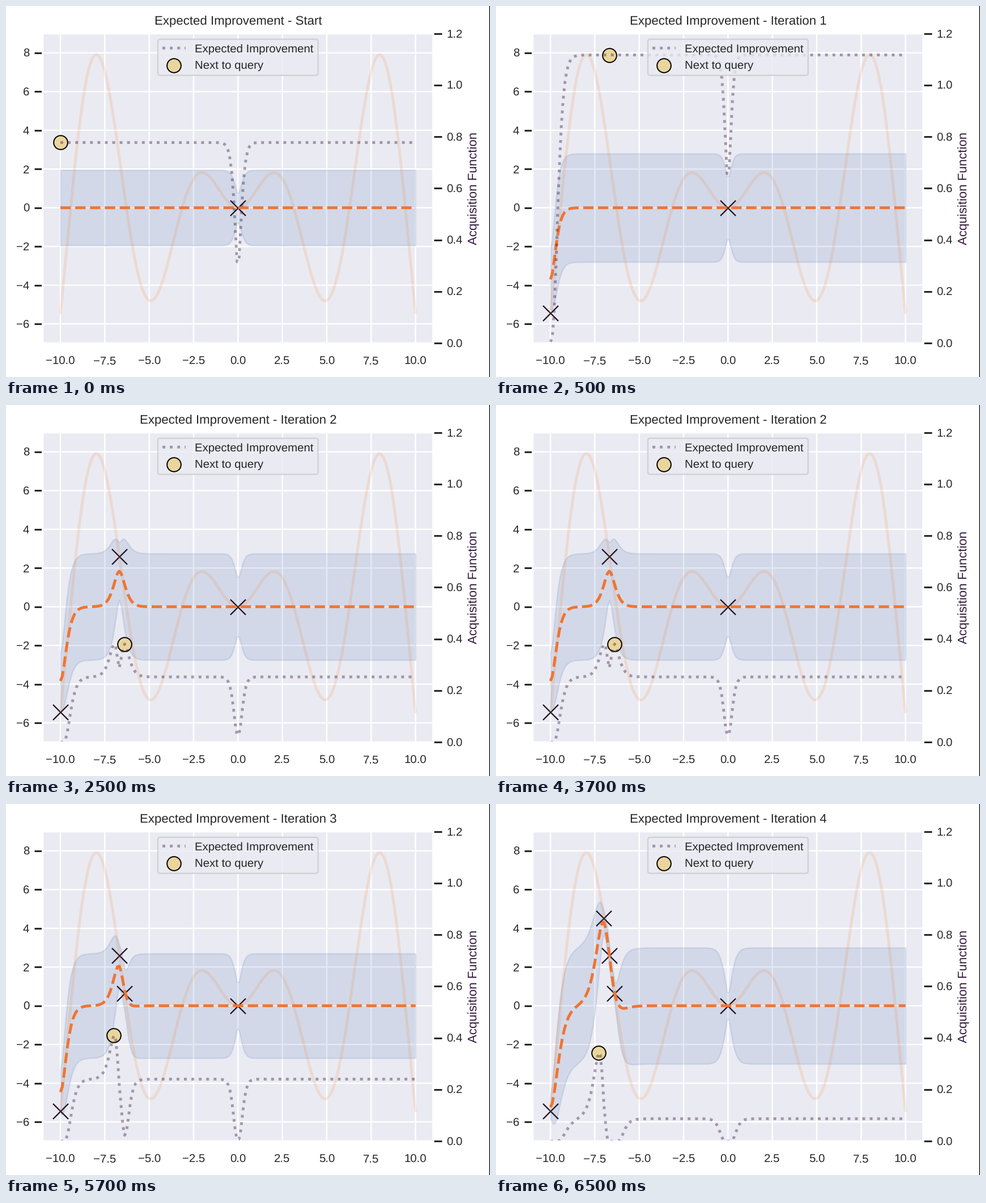
These frames come from a looping animation (854x656 px, 8 s). A matplotlib script:

```python
import math

import matplotlib.pyplot as plt
import numpy as np
from matplotlib.animation import FuncAnimation
from matplotlib.lines import Line2D

W, H, DPI = 854, 656, 177.6
LEFT, RIGHT, TOP, BOTTOM = 64.7, 753.9, 48.7, 596.3

INK = "0.15"
PANEL = "#eaeaf2"
ORANGE = "#f07432"
PEACH = "#f58028"
BLUE = "#4c72b0"
PURPLE = "#35193e"
SAND = "#ead59c"

plt.rcParams.update({
    "font.family": "Liberation Sans",
    "font.size": 9,
    "axes.titlesize": 9,
    "axes.labelsize": 9,
    "xtick.labelsize": 8.25,
    "ytick.labelsize": 8.25,
    "legend.fontsize": 8.25,
    "text.color": INK,
    "text.hinting": "none",
    "path.snap": False,
    "axes.facecolor": PANEL,
    "axes.edgecolor": "white",
    "axes.linewidth": 1.25,
    "axes.axisbelow": True,
    "grid.color": "white",
    "grid.linewidth": 1,
    "patch.linewidth": 1,
    "lines.linewidth": 2,
    "lines.solid_capstyle": "round",
})

xs = np.linspace(-10, 10, 200)
# Observed points in query order, and the point asked for after the last step
QUERIES = np.array([0, *xs[[0, 33, 36, 30, 27]]])
# Fitted kernel variance, noise variance and length scale for each step
FITS = [(3.80, 0.62, 0.38), (7.84, 3.69, 0.32), (7.56, 3.16, 0.36),
        (7.29, 1.60, 0.365), (9.00, 0.35, 0.48)]

norm_cdf = np.vectorize(lambda z: 0.5 * (1 + math.erf(z / math.sqrt(2))))


def objective(x):
    return x * np.sin(x)


def matern(a, b, length):
    s = math.sqrt(5) * np.abs(np.subtract.outer(a, b)) / length
    return (1 + s + s**2 / 3) * np.exp(-s)


def posterior(step, x):
    variance, noise, length = FITS[step]
    known = QUERIES[:step + 1]
    gram = variance * matern(known, known, length) + noise * np.eye(len(known))
    cross = variance * matern(x, known, length)
    weights = np.linalg.solve(gram, cross.T)
    mean = weights.T @ objective(known)
    spread = np.sqrt(variance - np.sum(cross.T * weights, axis=0))
    return mean, spread


def expected_improvement(step, x):
    mean, spread = posterior(step, x)
    gain = mean - objective(QUERIES[:step + 1]).max()
    z = gain / spread
    density = np.exp(-z**2 / 2) / math.sqrt(2 * math.pi)
    return gain * norm_cdf(z) + spread * density


fig = plt.figure(figsize=((W + 0.01) / DPI, (H + 0.01) / DPI), dpi=DPI,
                 facecolor="white")
ax = fig.add_axes([LEFT / W, 1 - BOTTOM / H,
                   (RIGHT - LEFT) / W, (BOTTOM - TOP) / H])
ax.set(xlim=(-11, 11), ylim=(-7, 9),
       xticks=np.arange(-10, 10.1, 2.5), yticks=range(-6, 9, 2))
ax.grid(True)
acq_ax = ax.twinx()
acq_ax.set(ylim=(0, 1.2), yticks=np.arange(0, 1.21, 0.2))
acq_ax.set_ylabel("Acquisition Function", color=PURPLE, labelpad=4)
for axes in (ax, acq_ax):
    axes.tick_params(length=6, width=1.25, pad=3.5, color=INK, labelcolor=INK)
ax.tick_params(axis="x", bottom=False)

# Dark rule along the right edge of the stage
fig.add_artist(Line2D([(W - 0.6) / W] * 2, [0, 1], color="black",
                      linewidth=1.3 * 72 / DPI))

title = ax.set_title("", pad=6, color=INK)
ax.plot(xs, objective(xs), color=PEACH, alpha=0.15)
mean_line, = ax.plot([], [], "--", color=ORANGE)
seen = ax.scatter([], [], s=120, marker="x", color="#1d0f20", linewidths=0.9)
acq_line, = acq_ax.plot([], [], ":", color=PURPLE, alpha=0.4,
                        label="Expected Improvement")
target = acq_ax.scatter([], [], s=100, color=SAND, edgecolors="black",
                        linewidths=0.8, label="Next to query")
acq_ax.legend(loc="upper center", facecolor=PANEL, edgecolor="0.8",
              framealpha=0.8)

steps = [(*posterior(i, xs), expected_improvement(i, xs))
         for i in range(len(FITS))]
band = None


def draw(frame):
    global band
    step = (frame + 3) // 4
    mean, spread, improvement = steps[step]
    known = QUERIES[:step + 1]
    query = QUERIES[step + 1]

    title.set_text("Expected Improvement - "
                   + (f"Iteration {step}" if step else "Start"))
    if band is not None:
        band.remove()
    band = ax.fill_between(xs, mean - spread, mean + spread, color=BLUE,
                           alpha=0.15, zorder=0.9)
    mean_line.set_data(xs, mean)
    acq_line.set_data(xs, improvement)
    seen.set_offsets(np.column_stack([known, objective(known)]))
    height = expected_improvement(step, np.array([query]))[0]
    target.set_offsets([[query, height]])
    return title, band, mean_line, acq_line, seen, target


anim = FuncAnimation(fig, draw, frames=16, interval=500, repeat=True,
                     repeat_delay=0, init_func=lambda: draw(0))
plt.show()
```
